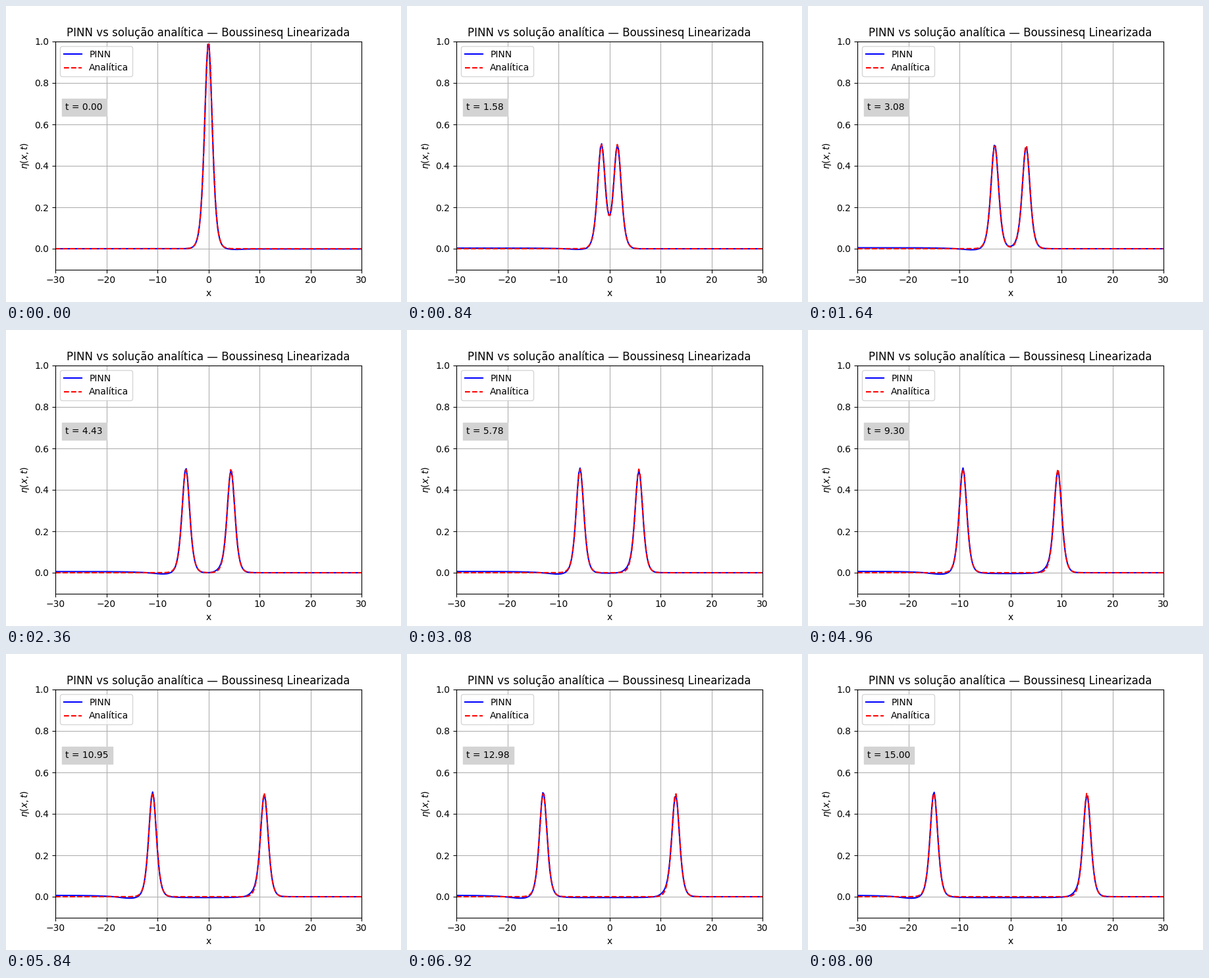
A matplotlib script that plays this animation: 600 px wide and 450 px high, repeating every 8.04 s.

```python
import numpy as np
import matplotlib.pyplot as plt
from matplotlib.animation import FuncAnimation

FRAMES = 201
INTERVAL = 40

x = np.linspace(-30, 30, 256)
times = np.linspace(0, 15, FRAMES).astype(np.float32)


def sech2(u):
    return 1 / np.cosh(u) ** 2


def bump(u, width):
    return np.exp(-(u / width) ** 2)


def step(u):
    return 0.5 * (1 + np.tanh(u / 2))


def analytic(t):
    return 0.5 * (sech2(x - t) + sech2(x + t))


def network(t):
    """Analytic wave plus the small, smooth errors of the trained model."""
    left, right = x + t, x - t
    grow = 1 - np.exp(-t / 2.5)
    late = 1 - np.exp(-(t / 4) ** 2)
    early = np.exp(-t)

    err = 0.0065 * grow * np.tanh(np.maximum(-left - 7, 0) / 5)
    err -= 0.0075 * grow * bump(left + 4.3, 2.3)
    err += 0.006 * grow * bump(left, 0.8)
    err -= 0.004 * late * step(left - 4) * step(-right - 5)
    err += 0.011 * late * bump(right + 2.2, 1.2)
    err -= 0.009 * grow * bump(right, 0.7)
    err -= early * (0.003 * bump(x - 5, 2) + 0.0012 * step(x - 5))
    return analytic(t) + err


fig, ax = plt.subplots(figsize=(6, 4.5), dpi=100)
pinn, = ax.plot(x, network(0.0), "b-", label="PINN")
exact, = ax.plot(x, analytic(0.0), "r--", label="Analítica")
clock = ax.text(-28, 0.67, "t = 0.00",
                bbox=dict(facecolor="lightgray", edgecolor="lightgray"))

ax.set_xlim(-30, 30)
ax.set_ylim(-0.1, 1.0)
ax.set_xlabel("x")
ax.set_ylabel(r"$\eta(x,t)$")
ax.set_title("PINN vs solução analítica — Boussinesq Linearizada")
ax.legend(loc="upper left")
ax.grid(True)


def update(i):
    t = float(times[i])
    pinn.set_ydata(network(t))
    exact.set_ydata(analytic(t))
    clock.set_text(f"t = {t:.2f}")
    return pinn, exact, clock


anim = FuncAnimation(fig, update, frames=FRAMES, interval=INTERVAL,
                     repeat=True, repeat_delay=0, blit=False)
plt.show()
```
